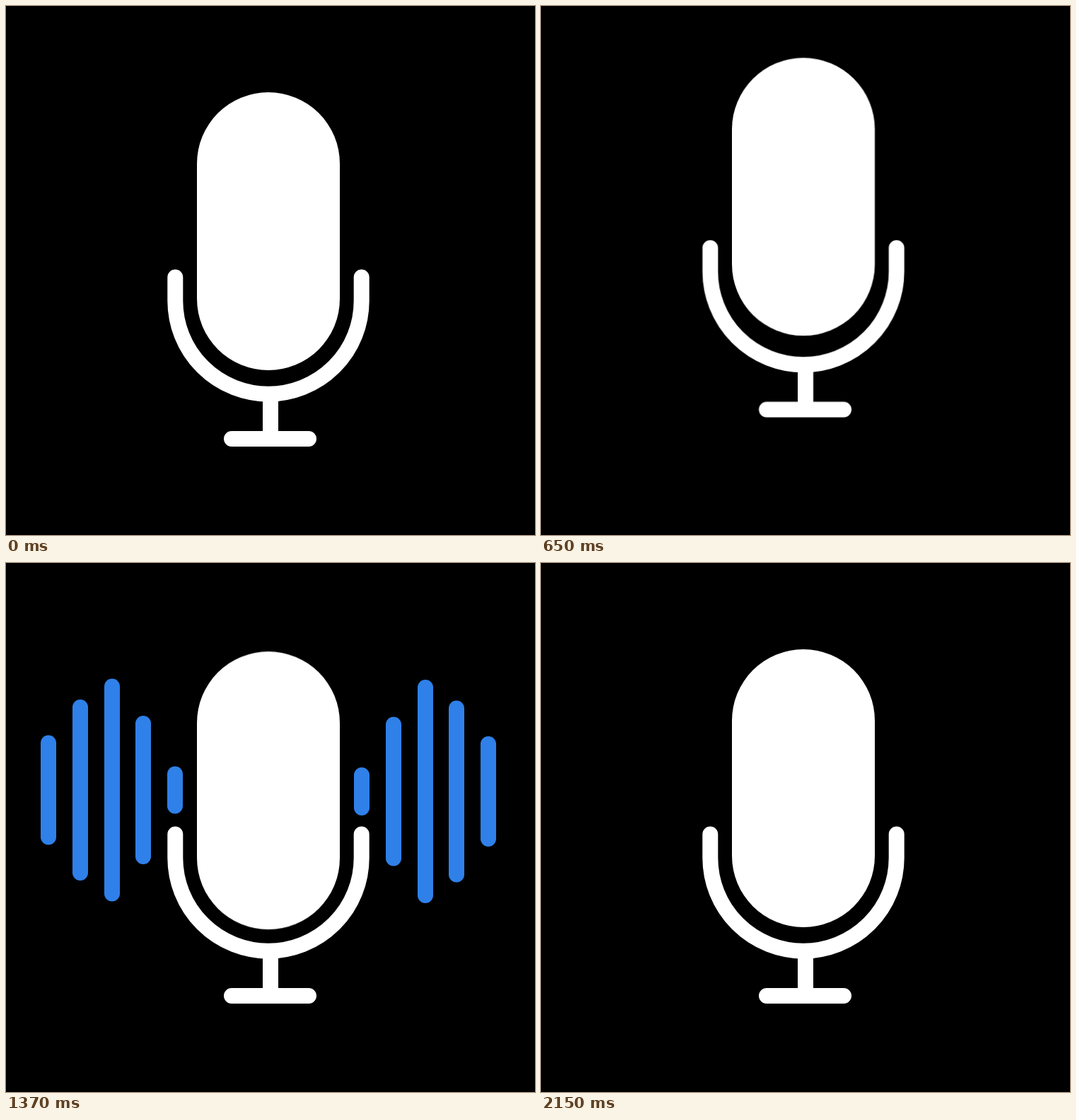
Recreate the animation shown at these times as an HTML page without scripts. Size 748x748 px, loop 2.18 s.

```html
<!DOCTYPE html>
<html lang="en">
<head>
<meta charset="utf-8">
<title>Microphone</title>
<style>
html, body { margin: 0; width: 100%; height: 100%; overflow: hidden; background: #000; }
svg { position: absolute; left: 0; top: 0; width: 748px; height: 748px; }
.head, .stand { animation: 2180ms linear infinite; }
.head { fill: #fff; transform-origin: 371px 515px; animation-name: head; }
.stand {
  fill: none; stroke: #fff; stroke-width: 22; stroke-linecap: round;
  transform-origin: 371px 623px; animation-name: stand;
}

/* The stand leaps first, the head follows and flies higher */
@keyframes stand {
  0%, 10.55% { transform: none; animation-timing-function: ease-in; }
  19% { transform: translateY(-27px) scaleY(1.012); animation-timing-function: ease-out; }
  24.8% { transform: translateY(-52px); animation-timing-function: ease-in; }
  30% { transform: translateY(-41px); }
  33.9% { transform: translateY(-10px); animation-timing-function: ease-out; }
  36.9%, 100% { transform: none; }
}
@keyframes head {
  0%, 10.55% { transform: none; animation-timing-function: ease-in; }
  19% { transform: translateY(-20px) scaleY(1.013); animation-timing-function: ease-out; }
  25.2% { transform: translateY(-63px); animation-timing-function: ease-in; }
  30% { transform: translateY(-48px); }
  33.9% { transform: translateY(-12px); animation-timing-function: ease-out; }
  42.2% { transform: translateY(2px); animation-timing-function: ease-in-out; }
  52.8%, 58.7% { transform: translateY(6px); }
  63.1% { transform: translateY(3px); animation-timing-function: ease-out; }
  69.7%, 100% { transform: none; }
}

/* Sound bars: --x centre, --a first, --p peak and --b low height */
.bar {
  position: absolute; left: calc(var(--x) * 1px - 11px); top: 321.2px;
  width: 22px; border-radius: 11px; background: #2f80e9;
  transform: translateY(-50%); visibility: hidden;
  animation: pulse 2180ms linear infinite, show 2180ms step-end infinite;
}
.late { animation-name: pulse, show-late; }
.right .bar { top: 322.7px; padding-bottom: 1px; }
.i1 { --a: 52px; --p: 67px; --b: 68px; }
.i2 { --a: 78px; --p: 210px; --b: 116px; }
.i3 { --a: 70px; --p: 315px; --b: 116px; }
.i4 { --a: 22px; --p: 256px; --b: 85px; }
.i5 { --a: 22px; --p: 155px; --b: 101px; }
@keyframes pulse {
  0%, 36.7% { height: 22px; }
  42.5% { height: var(--a); animation-timing-function: ease-in-out; }
  62%, 63.8% { height: var(--p); animation-timing-function: ease-in-out; }
  77.5%, 80% { height: var(--b); animation-timing-function: ease-in-out; }
  86.2% { height: var(--p); animation-timing-function: ease-in-out; }
  98.6%, 100% { height: 22px; }
}
@keyframes show {
  0% { visibility: hidden; }
  36.7% { visibility: visible; }
  98.6%, 100% { visibility: hidden; }
}
@keyframes show-late {
  0% { visibility: hidden; }
  44% { visibility: visible; }
  98.6%, 100% { visibility: hidden; }
}
</style>
</head>
<body>
<svg viewBox="0 0 748 748">
  <rect class="head" x="270" y="122" width="202" height="393" rx="101"/>
  <g class="stand">
    <path d="M239.3 383.5V417A131.7 131.7 0 0 0 502.7 417V383.5"/>
    <path d="M374 549V612M319 612H428"/>
  </g>
</svg>
<div class="left">
  <div class="bar i5 late" style="--x:59.7"></div>
  <div class="bar i4 late" style="--x:104.6"></div>
  <div class="bar i3" style="--x:149.5"></div>
  <div class="bar i2" style="--x:194.4"></div>
  <div class="bar i1" style="--x:239.3"></div>
</div>
<div class="right">
  <div class="bar i1" style="--x:502.7"></div>
  <div class="bar i2" style="--x:547.6"></div>
  <div class="bar i3" style="--x:592.5"></div>
  <div class="bar i4 late" style="--x:637.4"></div>
  <div class="bar i5 late" style="--x:682.3"></div>
</div>
</body>
</html>
```
